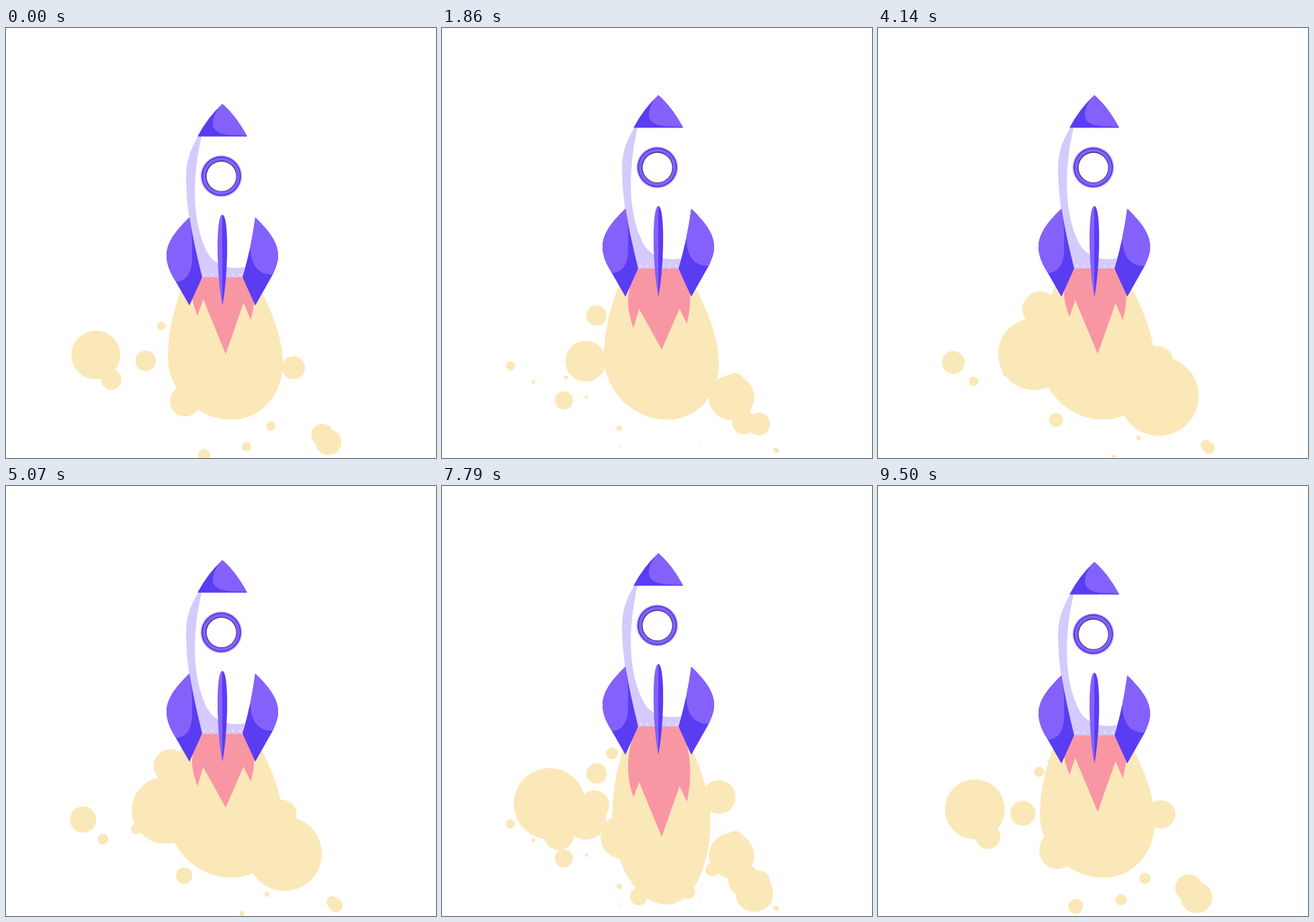
Write an HTML page with a canvas that moves like this. It is 640 by 640 pixels and loops after 9.57 s.

```html
<!DOCTYPE html>
<html lang="en">
<head>
<meta charset="utf-8">
<title>Rocket launch</title>
<style>
  html, body { margin: 0; width: 100%; height: 100%; overflow: hidden; background: #fff; }
  canvas { display: block; width: 100vmin; height: 100vmin; }
</style>
</head>
<body>
<canvas id="stage" width="640" height="640"></canvas>
<script>
const ctx = document.getElementById('stage').getContext('2d');
const LOOP = 9570, FPS = 14, TICKS = 134;
const SMOKE = '#fbe8b8', FLAME = '#f996a4', LIGHT = '#8561fb', DARK = '#5a3cf2', SHADE = '#d5cafd';

// The rocket sinks and rises in turn, starting at these ticks.
const turns = [6, 26, 42, 60, 70, 86, 98, 120];
const DIP = 13, TURN_TICKS = 3.4;

// Main smoke bursts; smaller ones fill the gaps evenly.
const mainBursts = [-2.5, 20.5, 40.2, 66.7, 90, 103.5, 109, 131.5];
const bursts = mainBursts.flatMap((start, i) => {
  const gap = (mainBursts[i + 1] ?? start) - start;
  const count = Math.max(1, Math.round(gap / 6.8));
  return Array.from({ length: count }, (_, n) => start + gap * n / count);
});

// Three stages of smoke. Puffs are x, y, radius, then the distance they drift.
const stages = [
  { // thrown wide, shrinking
    from: 0, to: 5.5,
    size: k => 1 - 0.87 * k ** 1.3,
    puffs: [
      [160, 473, 53, -58, 30], [174, 520, 22, -38, 7], [227, 475, 22, -42, 45],
      [253, 398, 9, -48, 100], [269, 522, 33, -5, 74], [412, 463, 25, 35, 94],
      [402, 571, 10, -17, 47], [367, 605, 10, -20, 40], [293, 611, 13, 5, 54],
      [450, 587, 24, 46, 41], [465, 606, 28, 33, 23]
    ]
  },
  { // swelling beside the plume, then collapsing
    from: 1, to: 5.5,
    size: k => Math.sin(0.81 * Math.PI * k ** 2.5),
    puffs: [
      [300, 446, 54, -86, 50], [285, 385, 27, -55, 43],
      [370, 540, 60, 61, 10], [340, 385, 24, 96, 142]
    ]
  },
  { // last wisps
    from: 5.4, to: 8.5,
    size: k => 1 - k ** 4,
    puffs: [
      [181.5, 554, 13.5, -6, 10], [215, 549, 2.6, 1, 8], [264, 622, 1.5, 0, 8],
      [449, 587, 17.5, 12, 10], [471, 589, 17, 11, 12]
    ]
  }
];

function smooth(k) {
  k = Math.min(1, Math.max(0, k));
  return k * k * (3 - 2 * k);
}

function bump(t, from, to) {
  return t > from && t < to ? Math.sin(Math.PI * (t - from) / (to - from)) ** 2 : 0;
}

function sink(tick) {
  const raised = turns.reduce((sum, start, i) =>
    sum + (i % 2 ? -1 : 1) * smooth((tick - start) / TURN_TICKS), 0);
  return DIP * (1 - raised);
}

function fill(path, color) {
  ctx.fillStyle = color;
  ctx.fill(new Path2D(path));
}

function disc(x, y, r, color) {
  ctx.fillStyle = color;
  ctx.beginPath();
  ctx.arc(x, y, Math.max(0, r), 0, 7);
  ctx.fill();
}

function drawSmoke(tick) {
  for (const start of bursts) {
    for (const { from, to, size, puffs } of stages) {
      const k = (tick - start - from) / (to - from);
      if (k < 0 || k > 1.01) continue;
      for (const [x, y, r, dx, dy] of puffs) disc(x + dx * k, y + dy * k, r * size(k), SMOKE);
    }
  }
}

function drawPlume(stretch) {
  const bottom = 583 + 40 * stretch, low = 490 + (bottom - 490) * 0.54;
  const width = 1 - 0.145 * stretch;
  ctx.save();
  ctx.translate(326.5 * (1 - width), 0);
  ctx.scale(width, 1);
  fill(`M325 300C285 320 241 410 241 490C241 ${low} 285 ${bottom} 336 ${bottom}
    C380 ${bottom} 412 ${low + 5} 412 500C412 450 385 390 325 300Z`, SMOKE);
  ctx.restore();
}

function drawFlame(base, stretch, flicker) {
  const at = (y, long, short) => y + long * stretch + short * flicker;
  const tip = at(485.5, 36.5, -7), left = at(428.5, 34.5, 18.5), right = at(434.5, 35.5, 5.5);
  fill(`M293 ${base}C278 ${base + 20} 270 ${left - 40} 285 ${left}L293.5 ${at(403.5, 37.5, 15)}
    L327 ${tip}L353.5 ${at(409, 38, 9)}L364.5 ${right}
    C374 ${right - 38} 370 ${base + 20} 351 ${base}Z`, FLAME);
}

function drawRocket() {
  fill('M286 148.5C273 170 268 188 268 208C268 260 279 312 291 358H352C363 320 374 265 376 215C377 190 373 170 359 148.5Z', '#fff');
  fill('M286 148.5C273 170 268 188 268 208C268 260 279 312 291 358H352L355 343C330 347 310 340 299 320C286 294 281 262 281 232C281 205 285 174 291 148.5Z', SHADE);

  fill('M322 100Q342 117 359 148.5H285Q300 120 322 100Z', DARK);
  fill('M322 100C308 115 304 131 312 139C320 147 335 146 358 147Q342 117 322 100Z', LIGHT);

  for (let x = 287.5; x < 359; x += 9.5) disc(x, 152, 0.8, '#e3dfee');
  for (const x of [295.5, 306, 338, 348.5]) disc(x, 354, 1.3, '#f3eefc');

  disc(320.4, 207.5, 31.5, '#dad7e2');
  disc(320.4, 207.5, 29.7, DARK);
  disc(320.4, 207.5, 27.5, LIGHT);
  disc(320.4, 207.5, 23.4, '#4b3d85');
  disc(320.6, 207.8, 22, '#fff');

  fill('M273 269C250 291 239 308 239 326C239 342 247 355 253 365L273 400L292 358Q280 310 273 269Z', DARK);
  fill('M273 269C250 291 239 308 239 326C239 342 247 354 253 364.5C270 364 277 350 277 328C277 305 278 300 273 269Z', LIGHT);
  fill('M371 269C394 291 405 308 405 326C405 337 400 347 397 354L371 400L352 358Q366 310 371 269Z', DARK);
  fill('M371 269C394 291 405 308 405 326C405 337 400 347 397 354C375 355 363 338 364 311Q368 290 371 269Z', LIGHT);

  fill('M322 265C332 265 331 355 322 400Z', DARK);
  fill('M322 265C312 265 313 355 322 400Z', LIGHT);
}

function draw(now) {
  const tick = Math.floor((now % LOOP + 5) * FPS / 1000) % TICKS;
  const y = sink(tick), beat = tick % 15;
  const stretch = bump(beat, 0, 8), flicker = bump(beat, 8, 13.5);

  ctx.fillStyle = '#fff';
  ctx.fillRect(0, 0, 640, 640);
  drawSmoke(tick);
  drawPlume(stretch);
  drawFlame(358 + y, stretch, flicker);
  ctx.save();
  ctx.translate(0, y);
  drawRocket();
  ctx.restore();
}

const began = performance.now();
function run() {
  draw(performance.now() - began);
  requestAnimationFrame(run);
}
run();
</script>
</body>
</html>
```
